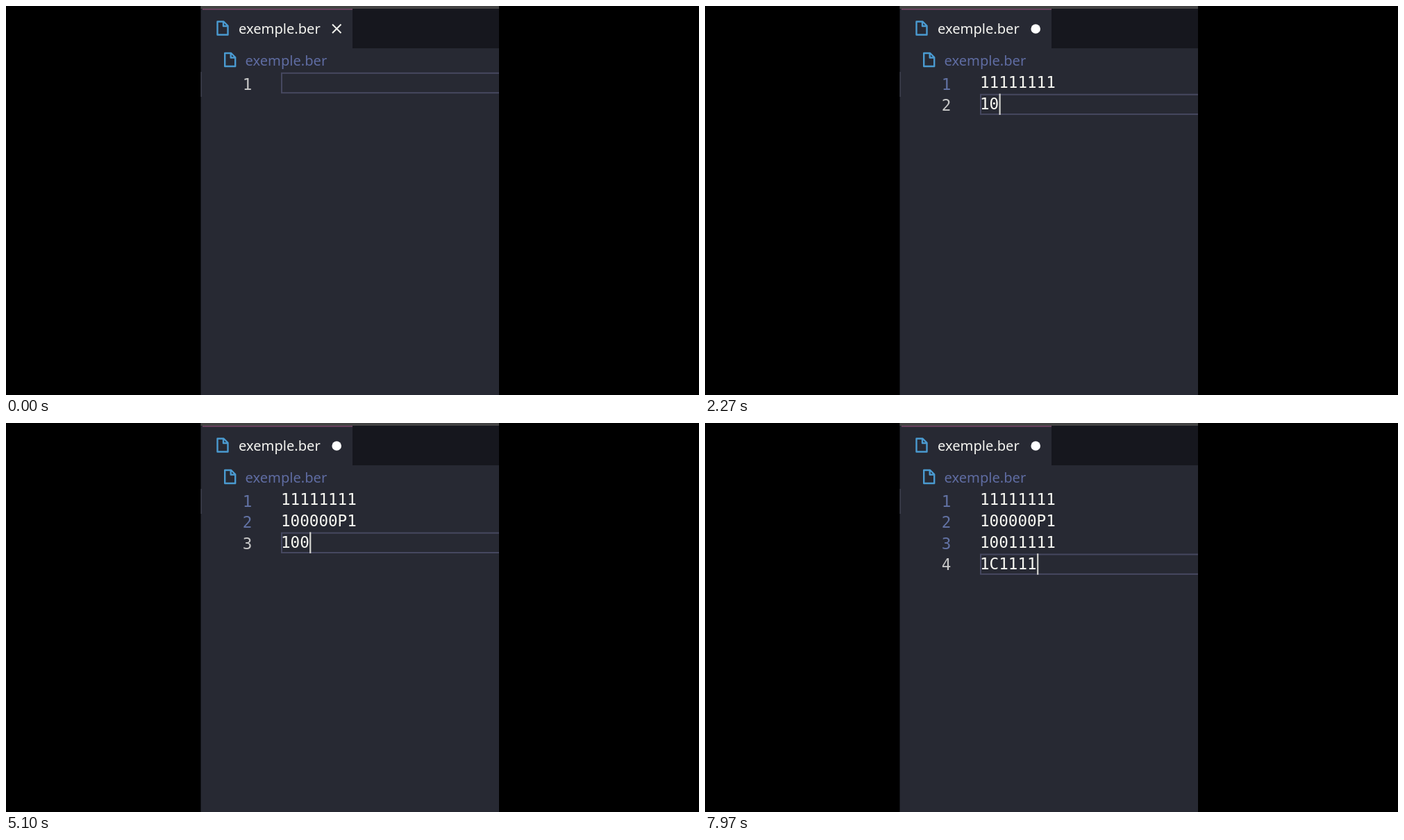
Write an HTML page that moves like this. It is 998 by 561 pixels and loops after 8 s.

```html
<!DOCTYPE html>
<html lang="en">
<head>
<meta charset="utf-8">
<title>Typing a map file</title>
<style>
  html, body { margin: 0; width: 100%; height: 100%; overflow: hidden; background: #000; }
  svg { display: block; width: 100%; height: 100%; }
  text { white-space: pre; }
  .label { font: 20.15px "Noto Sans", "Open Sans", sans-serif; }
  .code { font: 22.6px "DejaVu Sans Mono", "Liberation Mono", monospace; fill: #f8f8f2; }
  .number { text-anchor: middle; fill: #6272a4; }
  .number.active { fill: #c8c8c8; }
</style>
</head>
<body>
<svg viewBox="0 0 998 561">
  <defs>
    <clipPath id="window"><rect x="280.5" width="429.5" height="561"/></clipPath>
    <path id="file" d="M2 1.5H11L17 7.5V20.5H2ZM10.5 1.5V8H17" fill="none"
      stroke="#4a9ad0" stroke-width="2.4" stroke-linejoin="round"/>
  </defs>
  <g clip-path="url(#window)">
    <rect x="280" width="430" height="561" fill="#272933"/>
    <rect x="280" width="430" height="4" fill="#434343"/>
    <rect x="499" y="4" width="211" height="57" fill="#16171e"/>
    <rect x="283" y="4" width="216" height="1.5" fill="#784669"/>
    <rect x="280" y="95" width="2" height="36" fill="#3c3e4c"/>

    <use href="#file" x="302.5" y="21"/>
    <text class="label" x="335" y="40" fill="#f4f4f0">exemple.ber</text>
    <path id="close" d="M470 26.5L482.5 39M482.5 26.5L470 39" stroke="#f0f0ec" stroke-width="2"/>
    <circle id="unsaved" cx="476.2" cy="33" r="6.8" fill="#fff"/>
    <use href="#file" x="313.2" y="66.5"/>
    <text class="label" x="344.5" y="86" fill="#5f6ca2">exemple.ber</text>

    <rect id="current" x="397" width="330" height="28.4" fill="none" stroke="#464860" stroke-width="2"/>
    <g id="lines"></g>
    <rect id="cursor" width="2.2" height="30.5" fill="#d2d2ce"/>
  </g>
</svg>
<script>
  const LOOP = 8000;
  const ADVANCE = 13.65;
  const ROW = 30.9;

  const typed = "11111111\n100000P1\n10011111\n1C1111";

  // One time per typed character, Enter included; one line per row.
  const keyTimes = [
    70, 230, 390, 550, 700, 850, 1000, 1150, 1500,
    1800, 2130, 2340, 2490, 2640, 2800, 3160, 3560, 4000,
    4280, 4580, 5010, 5120, 5210, 5380, 5530, 5670, 5930,
    6610, 6960, 7440, 7600, 7760, 7910
  ];

  const byId = id => document.getElementById(id);
  const show = (id, on) => byId(id).setAttribute("visibility", on ? "visible" : "hidden");

  function addText(className, x, y) {
    const node = document.createElementNS("http://www.w3.org/2000/svg", "text");
    node.setAttribute("class", className);
    node.setAttribute("x", x);
    node.setAttribute("y", y);
    return byId("lines").appendChild(node);
  }

  const rows = typed.split("\n").map((_, i) => ({
    number: addText("code number", 347.5, 120.6 + 30.6 * i),
    text: addText("code", 396, 118.3 + ROW * i)
  }));

  function draw(time) {
    const count = keyTimes.filter(t => t <= time).length;
    const content = typed.slice(0, count).split("\n");
    const active = content.length - 1;

    rows.forEach(({ number, text }, i) => {
      number.textContent = i <= active ? i + 1 : "";
      number.classList.toggle("active", i === active);
      text.textContent = content[i] || "";
    });

    show("close", count === 0);
    show("unsaved", count > 0);
    show("cursor", count > 0);
    byId("current").setAttribute("y", 96.8 + ROW * active);
    byId("cursor").setAttribute("x", 396.2 + ADVANCE * content[active].length);
    byId("cursor").setAttribute("y", 95.6 + ROW * active);
  }

  const start = performance.now();
  function tick() {
    draw((performance.now() - start) % LOOP);
    requestAnimationFrame(tick);
  }
  draw(0);
  requestAnimationFrame(tick);
</script>
</body>
</html>
```
